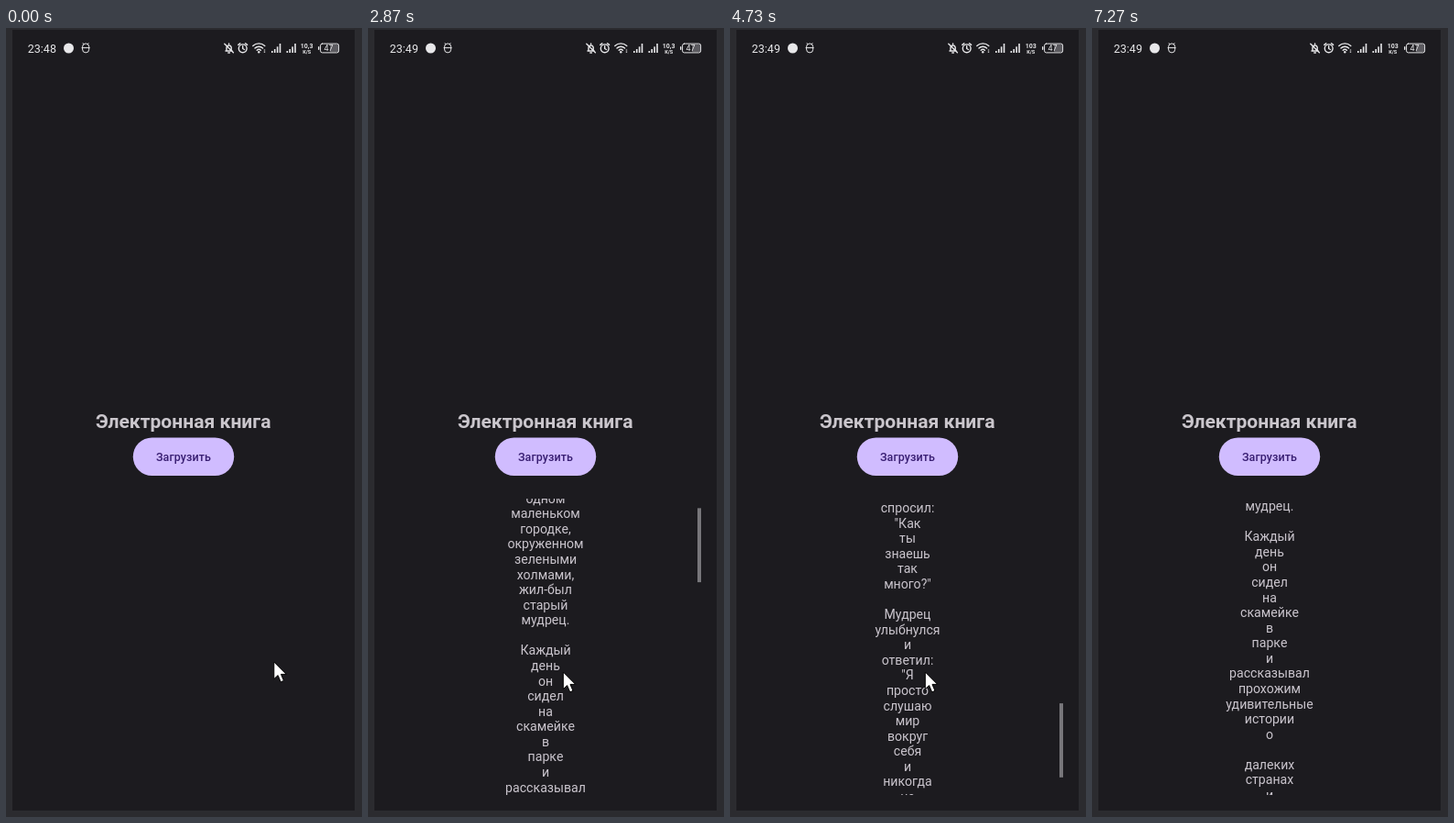
These frames come from a looping animation (389 by 860 pixels, 7470 ms). An HTML page:

```html
<!DOCTYPE html>
<html lang="ru">
<head>
<meta charset="utf-8">
<title>Электронная книга</title>
<style>
html, body { margin: 0; width: 100%; height: 100%; overflow: hidden; background: #2b2b2f; }
svg { display: block; width: 389px; height: 860px; font-family: Roboto, "Noto Sans", sans-serif; }
text { white-space: pre; }
.mid { text-anchor: middle; }
.title { font-size: 21.1px; font-weight: 700; fill: #cac6cc; }
.label { font-size: 12.5px; font-weight: 500; letter-spacing: .1px; fill: #381e72; }
.book { font-size: 14.14px; fill: #cac5cd; }
.clock { font-size: 12.5px; }
.rate { font-size: 7px; font-weight: 700; }
.unit { font-size: 5.6px; font-weight: 700; }
.level { font-size: 9px; }
.status { fill: #e8e8ea; }
.line { fill: none; stroke: #e8e8ea; stroke-width: 1.4; stroke-linecap: round; stroke-linejoin: round; }
.thin { stroke-width: 1; }
</style>
</head>
<body>
<svg viewBox="0 0 389 860">
  <defs>
    <clipPath id="page"><rect x="7" y="513" width="374" height="323"/></clipPath>
    <clipPath id="pill"><rect x="138.8" y="446.4" width="110.4" height="41.6" rx="20.8"/></clipPath>
    <radialGradient id="soft">
      <stop offset=".5" stop-color="#bba8ec"/>
      <stop offset="1" stop-color="#bba8ec" stop-opacity="0"/>
    </radialGradient>
  </defs>
  <rect x="7" y="2" width="374" height="851" fill="#1c1b1f"/>

  <g class="status">
    <text id="clock" class="clock" x="23.8" y="26.5">23:48</text>
    <circle cx="68.5" cy="22" r="5.5"/>
    <path class="line thin" d="M83.5 20.5a3.6 3.6 0 0 1 7.2 0v2.8a3.6 3.6 0 0 1-7.2 0zM83 21.6h8.2M84.2 16.6l1 1.2M90 16.6l-1 1.2"/>
    <!-- muted bell, alarm -->
    <path class="line" d="M240 25h7.2M241 25v-4a2.7 2.7 0 0 1 5.2 0v4M243.6 17v.8M242.8 27h1.6M238.8 17.2l9.6 9.6"/>
    <g class="line"><circle cx="258.7" cy="22.3" r="4.4"/><path d="M258.7 19.8v2.7l1.8 1M253.8 18.4l2-1.7M263.6 18.4l-2-1.7"/></g>
    <!-- wifi -->
    <path class="line" d="M269.8 19.6a9.2 9.2 0 0 1 13 0M272 22a6.2 6.2 0 0 1 8.6 0M274.2 24.2a3.2 3.2 0 0 1 4.2 0"/>
    <circle cx="276.3" cy="26.2" r="1.2"/>
    <path d="M281.8 23.4h1.4v1.2h-1.4zM281.8 25.6h1.4v1.2h-1.4z"/>
    <g id="bars"></g>
    <text id="rate" class="rate mid" x="328.7" y="22">10,3</text>
    <text class="unit mid" x="328.7" y="28">K/S</text>
    <rect x="354" y="18" width="9" height="8" fill="#5c5b60"/>
    <rect class="line thin" x="343.6" y="17.1" width="20" height="9.8" rx="2"/>
    <rect x="341" y="20" width="1.4" height="4" rx=".7"/>
    <text class="level mid" x="352.6" y="25.3">47</text>
  </g>

  <text class="title mid" x="193.7" y="436.3">Электронная книга</text>
  <g clip-path="url(#pill)">
    <rect x="138" y="446" width="112" height="43" fill="#d0bcff"/>
    <circle id="ripple" cx="201" cy="472" fill="url(#soft)"/>
  </g>
  <text class="label mid" x="194" y="471.8">Загрузить</text>

  <g clip-path="url(#page)"><g id="book" class="book mid"></g></g>
  <rect id="thumb" x="360" width="4" fill="#77767a"/>
  <path id="cursor" d="M0 0V18.6L4.3 14.6 7.4 21.8 10.7 20.4 7.7 13.4H13.4Z" fill="#fff" stroke="#000" stroke-width="1"/>
</svg>
<script>
const LOOP = 7470, STEP = 1000 / 15;
const TOP = 513, VIEW = 323, PITCH = 16.57;
const story = `Однажды в одном маленьком городке, окруженном зелеными холмами, жил-был старый мудрец.
Каждый день он сидел на скамейке в парке и рассказывал прохожим удивительные истории о
далеких странах и приключениях. Люди собирались вокруг него, как пчелы к цветку,
и с замиранием сердца слушали его рассказы.
Однажды к мудрецу подошел юноша и спросил: "Как ты знаешь так много?"
Мудрец улыбнулся и ответил: "Я просто слушаю мир вокруг себя и никогда не перестаю учиться у него".`;
// one word per line, an empty line between paragraphs
const words = story.split("\n").map(p => p.split(" ").join("\n")).join("\n\n").split("\n");
const full = words.length * PITCH;

const clamp = v => Math.min(1, Math.max(0, v));
const easeIn = k => p => p ** k;
const easeOut = k => p => 1 - (1 - p) ** k;
const smooth = p => p * p * (3 - 2 * p);

const swipes = [
  { from: 2533, till: 3133, to: [160], ease: easeIn(2.3) },
  { from: 3267, till: 3867, to: [662], ease: easeOut(1.88) },
  { from: 4133, till: 4933, to: [full - VIEW], ease: easeOut(1) },
  { from: 5867, till: 6667, to: [165.6], ease: easeOut(3.18) },
];
const moves = [
  { from: 0, till: 400, to: [224, 428], ease: smooth },
  { from: 667, till: 1000, to: [201.5, 475.5], ease: smooth },
  { from: 1600, till: 2200, to: [213.3, 702], ease: smooth },
];

// carries a value through each move in turn
const follow = (start, list, t) => list.reduce((pos, m) => {
  const p = m.ease(clamp((t - m.from) / (m.till - m.from)));
  return pos.map((v, i) => v + (m.to[i] - v) * p);
}, start);

// the scrollbar shows while swiping and fades after a short rest
function thumbAlpha(t) {
  const last = swipes.filter(s => t > s.from).pop();
  return last ? 1 - clamp((t - last.till - 330) / 265) : 0;
}

const $ = id => document.getElementById(id);
const set = (el, attrs) => { for (const k in attrs) el.setAttribute(k, attrs[k]); };

function add(parent, tag, attrs, content = "") {
  const el = document.createElementNS("http://www.w3.org/2000/svg", tag);
  set(el, attrs);
  el.textContent = content;
  parent.append(el);
}

words.forEach((w, i) => add($("book"), "text", { x: 194, y: TOP + 13.1 + i * PITCH }, w));
for (const x of [290, 306.5])
  for (let i = 0; i < 4; i++) {
    const h = 2 + i * (i + 5) / 3;
    add($("bars"), "rect", { x: x + i * 2.9, y: 27 - h, width: 1.6, height: h });
  }
set($("thumb"), { height: VIEW * VIEW / full });

function draw(now) {
  const t = Math.floor((now % LOOP + 5) / STEP) * STEP;
  const [scroll] = follow([0], swipes, t);
  const [x, y] = follow([292.8, 691], moves, t);
  const press = t - 1130;
  $("clock").textContent = t < 1000 ? "23:48" : "23:49";
  $("rate").textContent = t < 3660 ? "10,3" : "103";
  set($("book"), { transform: `translate(0 ${-scroll})`, opacity: t < 1590 ? 0 : 1 });
  set($("thumb"), { y: TOP + scroll * VIEW / full, opacity: thumbAlpha(t) });
  set($("ripple"), { r: 120 * clamp(press / 400), opacity: clamp(press / 140) * clamp((1070 - press) / 670) });
  set($("cursor"), { transform: `translate(${x} ${y})`, opacity: t < 6660 ? 1 : 0 });
}

function tick() {
  draw(performance.now());
  requestAnimationFrame(tick);
}
tick();
</script>
</body>
</html>
```
